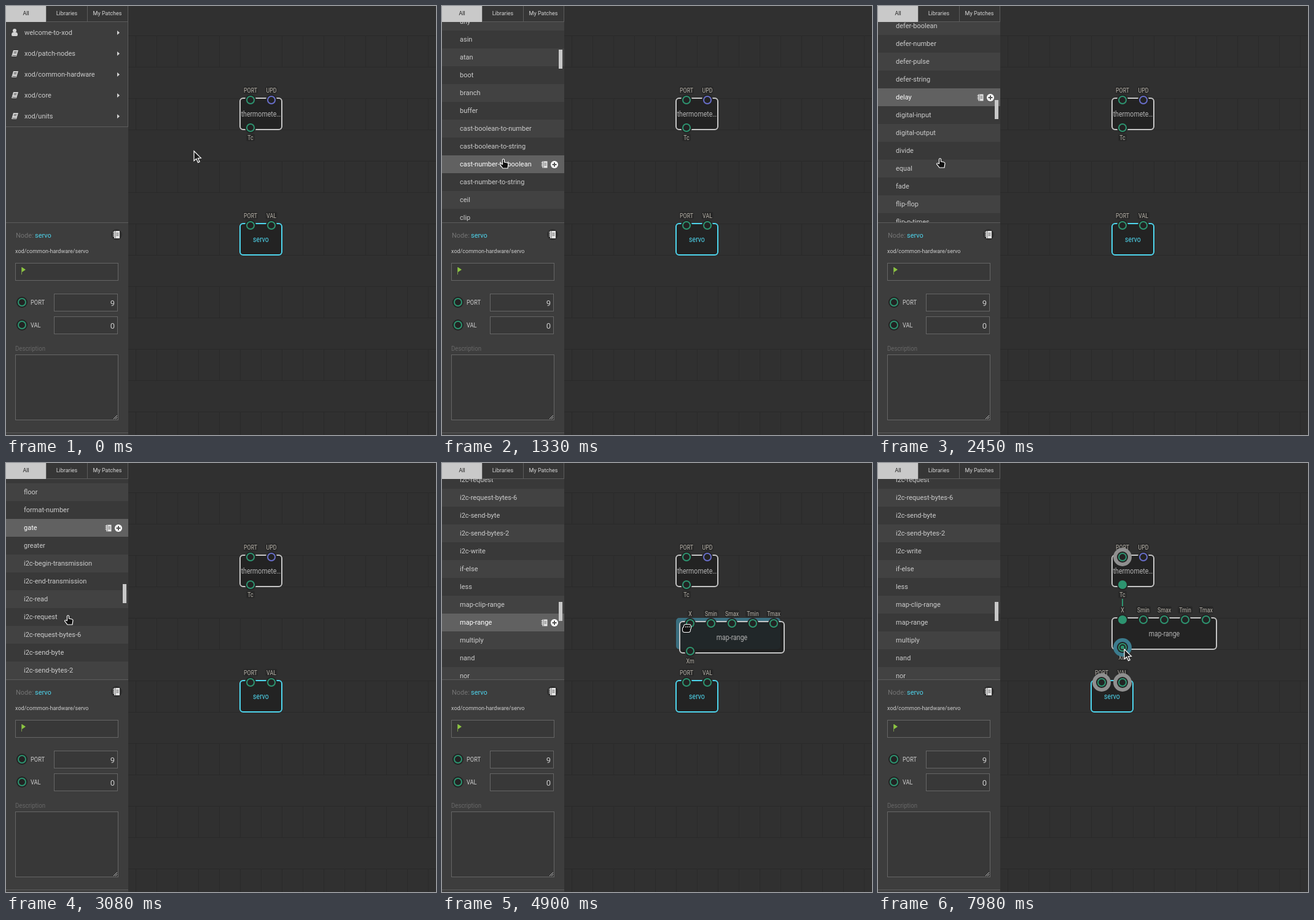
An HTML page with a canvas that plays this animation: 700 px wide and 698 px high, repeating every 8 s.

```html
<!DOCTYPE html>
<html lang="en">
<head>
<meta charset="utf-8">
<title>Patch editor</title>
<style>
html, body { margin: 0; width: 100%; height: 100%; overflow: hidden; background: #303030; }
canvas { display: block; }
</style>
</head>
<body>
<canvas id="stage" width="700" height="698"></canvas>
<script>
const ctx = document.getElementById('stage').getContext('2d');
const LOOP = 8000, TICK = 70;
const GREEN = '#2d9470', PULSE = '#686ec9', CYAN = '#4ed5ed', TEAL = '#3b7c8e';
const BODY = '#232323', TEXT = '#cccccc', EDGE = '#5c5c5c';

const coreItems = `absolute acos add analog-input and any asin atan boot branch buffer
cast-boolean-to-number cast-boolean-to-string cast-number-to-boolean cast-number-to-string
ceil clip clock concat console-log constant-boolean constant-number constant-string constrain
continuously cos count defer-boolean defer-number defer-pulse defer-string delay digital-input
digital-output divide equal fade flip-flop flip-n-times floor format-number gate greater
i2c-begin-transmission i2c-end-transmission i2c-read i2c-request i2c-request-bytes-6
i2c-send-byte i2c-send-bytes-2 i2c-write if-else less map-clip-range map-range multiply
nand nor not not-equal`.split(/\s+/);

// Keyframes: [time, ...values]
const scrollKeys = [[770, 0], [840, 25], [1750, 530], [1820, 530], [2730, 1105], [2800, 1118],
  [3080, 1261], [3360, 1484]];
const cursorKeys = [[0, 306, 236], [210, 82, 149], [350, 82, 149], [770, 98, 250], [840, 98, 250],
  [1820, 101, 248], [3430, 101, 248], [4060, 98, 264], [4130, 98, 264], [4600, 438, 278],
  [4900, 398, 268], [5040, 398, 268], [5810, 400, 199], [5950, 400, 199], [6370, 400, 255],
  [6440, 400, 255], [6860, 417, 381], [6930, 417, 381], [7280, 366, 391], [7420, 376, 386],
  [7490, 376, 386], [7700, 401, 303]];
// Hovered row is refreshed only now and then while the list scrolls.
const hoverTimes = [770, 1330, 1820, 2310, 2800, 3430];

function tween(keys, t) {
  if (t <= keys[0][0]) return keys[0].slice(1);
  const n = keys.findIndex(k => k[0] >= t);
  if (n < 0) return keys[keys.length - 1].slice(1);
  const a = keys[n - 1], b = keys[n], p = (t - a[0]) / (b[0] - a[0]);
  return a.slice(1).map((v, i) => v + (b[i + 1] - v) * p);
}

function rect(x, y, w, h, color) {
  ctx.fillStyle = color;
  ctx.fillRect(x, y, w, h);
}

function frame(x, y, w, h, color, fill) {
  rect(x, y, w, h, color);
  rect(x + 1, y + 1, w - 2, h - 2, fill);
}

function disc(x, y, r, color) {
  ctx.beginPath();
  ctx.arc(x, y, r, 0, Math.PI * 2);
  ctx.fillStyle = color;
  ctx.fill();
}

function shape(points, color, stroke) {
  ctx.beginPath();
  points.forEach(([x, y]) => ctx.lineTo(x, y));
  ctx.closePath();
  ctx.fillStyle = color;
  ctx.fill();
  if (stroke) {
    ctx.strokeStyle = stroke;
    ctx.lineWidth = 1.2;
    ctx.stroke();
  }
}

function at(x, y, draw) {
  ctx.save();
  ctx.translate(x, y);
  draw();
  ctx.restore();
}

function text(str, x, y, size, color = TEXT, align = 'left') {
  ctx.font = `${size}px Roboto, sans-serif`;
  ctx.textAlign = align;
  ctx.fillStyle = color;
  ctx.fillText(str, x, Math.round(y + size * 0.35));
}

// Narrow face used for nodes and pins
function narrow(str, x, y, size, color, align = 'center') {
  at(x, 0, () => {
    ctx.scale(0.88, 1);
    text(str, 0, y, size, color, align);
  });
}

function notebook(x, y, s) {
  at(x, y, () => {
    ctx.scale(s, s);
    rect(-4, -6, 9, 12, '#e6e6e6');
    for (let i = -4; i <= 4; i += 3) rect(-6, i - 0.5, 3, 1.2, '#e6e6e6');
    rect(-2.4, -6, 0.8, 12, '#555');
    for (let i = -3; i <= 1; i += 2) rect(-0.5, i, 4, 0.9, '#666');
  });
}

function plusButton(x, y) {
  disc(x, y, 6, '#fff');
  rect(x - 3.5, y - 1, 7, 2, '#555');
  rect(x - 1, y - 3.5, 2, 7, '#555');
}

function bookIcon(y) {
  shape([[12, y - 5], [20, y - 5], [17, y + 5], [9, y + 5]], '#d4d4d4');
  rect(13, y - 3, 4.5, 1, '#555');
  rect(12.5, y - 1, 4.5, 1, '#555');
  rect(10.5, y + 3, 6, 1, '#555');
}

function userIcon(y) {
  disc(14, y - 3, 3, '#d4d4d4');
  ctx.beginPath();
  ctx.roundRect(9, y - 0.5, 10, 6.5, [4, 4, 2, 2]);
  ctx.fill();
}

function libraryRow(name, top, open) {
  const y = top + 17;
  rect(0, top, 199, 34, '#3d3d3d');
  rect(0, top + 34, 199, 1, EDGE);
  rect(198, top, 1, 35, EDGE);
  name.includes('/') ? bookIcon(y) : userIcon(y);
  text(name, 30, y, 11);
  shape(open ? [[179, y - 1], [187, y - 1], [183, y + 3]]
             : [[181, y - 3], [185, y + 0.5], [181, y + 4]], '#d4d4d4');
}

function itemRow(name, i, top, hovered) {
  const y = top + 14;
  rect(0, top, 199, 29, hovered ? '#616161' : i % 2 ? '#424242' : '#393939');
  text(name, 29, y, 11, hovered ? '#fff' : TEXT);
  if (hovered) {
    notebook(167, y + 1, 0.9);
    plusButton(183, y + 1);
  }
}

function hoveredItem(t) {
  if (t < 350 || t > 5040) return -1;
  const when = t < 770 ? t : hoverTimes.filter(h => h <= t).pop();
  const [scroll] = tween(scrollKeys, when), [, y] = tween(cursorKeys, when);
  return Math.floor((y - 163 + scroll) / 29);
}

function drawList(t) {
  const open = t >= 350, [scroll] = tween(scrollKeys, t), s = Math.round(scroll);
  ctx.save();
  ctx.beginPath();
  ctx.rect(0, 26, 199, 326);
  ctx.clip();
  ['welcome-to-xod', 'xod/patch-nodes', 'xod/common-hardware', 'xod/core']
    .forEach((name, i) => libraryRow(name, 26 + 34 * i - s, open && i === 3));
  if (open) {
    const hovered = hoveredItem(t);
    coreItems.forEach((name, i) => {
      const top = 163 + 29 * i - s;
      if (top > -4 && top < 352) itemRow(name, i, top, i === hovered);
    });
    rect(190, Math.round(31.7 + 0.131 * scroll), 6, 31, '#c8c8c8');
  } else {
    libraryRow('xod/units', 162, false);
  }
  ctx.restore();
}

function drawTabs() {
  rect(0, 0, 199, 26, '#363636');
  rect(0, 0, 65, 26, '#c9c9c9');
  rect(65, 25, 134, 1, EDGE);
  [65, 132, 198].forEach(x => rect(x, 0, 1, 26, EDGE));
  text('All', 32.5, 12, 9, '#222', 'center');
  text('Libraries', 99, 12, 9, '#d4d4d4', 'center');
  text('My Patches', 165, 12, 9, '#d4d4d4', 'center');
}

function drawInspector() {
  rect(0, 352, 199, 346, '#3d3d3d');
  rect(0, 352, 199, 1, EDGE);
  text('Node:', 16, 373, 11, '#737373');
  text('servo', 47, 373, 11, CYAN);
  disc(180, 372, 9, '#2f2f2f');
  notebook(180, 372, 1);
  text('xod/common-hardware/servo', 15, 399, 9);

  frame(15, 418, 168, 29, '#666', '#383838');
  rect(25, 425, 1, 12, '#7a9a4a');
  shape([[26, 425], [32, 429], [26, 433]], '#8bc63f');

  [['PORT', '9', 482], ['VAL', '0', 519]].forEach(([name, value, y]) => {
    pin(26, y, {});
    narrow(name, 40, y, 10.5, TEXT, 'left');
    frame(78, y - 14, 104, 29, '#666', '#383838');
    text(value, 177, y + 1, 13, TEXT, 'right');
  });

  narrow('Description', 15, 557, 11, '#676767', 'left');
  frame(15, 567, 168, 107, '#666', '#383838');
  ctx.strokeStyle = '#bbb';
  ctx.lineWidth = 1;
  ctx.beginPath();
  [6, 3].forEach(d => {
    ctx.moveTo(181 - d, 672);
    ctx.lineTo(181, 672 - d);
  });
  ctx.stroke();
  rect(0, 694, 199, 1, EDGE);
}

function drawGrid() {
  rect(0, 0, 700, 698, '#303030');
  for (let y = 48; y < 698; y += 102) {
    rect(199, y, 501, 1, '#292929');
    rect(199, y + 51, 501, 1, '#292929');
    for (let x = 211; x < 700; x += 34) rect(x, y, 1, 51, '#2a2a2a');
  }
}

function pin(x, y, { color = GREEN, filled, halo, dot }) {
  if (halo) disc(x, y, 15, halo);
  disc(x, y, 9, BODY);
  disc(x, y, 7, color);
  if (!filled) disc(x, y, 5, BODY);
  if (dot) disc(x, y, 3, color);
}

function pinLabel(name, x, y) {
  const w = name.length * 5 + 4;
  ctx.beginPath();
  ctx.roundRect(x - w / 2, y - 6, w, 12, 3);
  ctx.fillStyle = '#282828';
  ctx.fill();
  narrow(name, x, y, 10, '#b3aea5');
}

function node(x, y, { name, inputs, output, selected }, pinState = {}, fill = BODY) {
  const w = Math.max(2, inputs.length) * 34;
  ctx.beginPath();
  ctx.roundRect(x, y, w, 51, 5);
  ctx.fillStyle = fill;
  ctx.fill();
  ctx.strokeStyle = selected ? CYAN : '#c4c4c4';
  ctx.lineWidth = 2;
  ctx.stroke();
  narrow(name, x + w / 2, y + 26, 12, selected ? CYAN : '#b2b2b2');

  const pins = inputs.map((label, i) => [label, x + 17 + 34 * i, y + 3, y - 13]);
  if (output) pins.push([output, x + 17, y + 48, y + 64]);
  pins.forEach(([label, px, , ly]) => pinLabel(label, px, ly));
  pins.forEach(([label, px, py]) =>
    pin(px, py, { color: label === 'UPD' ? PULSE : GREEN, ...pinState[label] }));
}

function ghost(x, y, w) {
  ctx.beginPath();
  ctx.roundRect(x, y, w, 51, 5);
  ctx.fillStyle = '#3a6f80';
  ctx.fill();
}

const snap = (v, origin, step) => origin + Math.round((v - origin) / step) * step;

const thermometer = { name: 'thermomete…', inputs: ['PORT', 'UPD'], output: 'Tc' };
const mapRange = { name: 'map-range', inputs: ['X', 'Smin', 'Smax', 'Tmin', 'Tmax'], output: 'Xm' };
const servo = { name: 'servo', inputs: ['PORT', 'VAL'], selected: true };

function drawPatch(t, cx, cy) {
  const linkingTc = t >= 6020 && t < 6510, linked = t >= 6510, linkingXm = t >= 7840;
  const open = { halo: '#8f8f8f' }, source = { halo: TEAL, dot: true };
  const joined = linked ? { filled: true } : {};
  const servoPins = linkingTc || linkingXm ? { PORT: open, VAL: open } : {};

  node(381, 150, thermometer, {
    PORT: linkingXm ? open : {},
    Tc: linkingTc ? source : t >= 5810 && !linked ? { dot: true } : joined
  });

  if (t >= 5040) {
    const state = { X: joined, Xm: linkingXm ? source : {} };
    if (linkingTc) mapRange.inputs.forEach(name => { state[name] = open; });
    node(381, 252, mapRange, state);
  }
  if (linked) rect(397, 221, 2, 12, GREEN);

  let sx = 381, sy = 354;
  if (t >= 7000 && t < 7490) {
    sx += cx - 417;
    sy += cy - 381;
    ghost(snap(sx, 381, 34), snap(sy, 354, 102), 68);
  } else if (t >= 7490) {
    sx = 347;
  }
  node(sx, sy, servo, servoPins);
}

function drawDragged(cx, cy) {
  const x = cx - 11, y = cy - 10;
  if (cx > 199) ghost(snap(x, 381, 34), snap(y, 252, 102), 170);
  node(x, y, mapRange, {}, 'rgba(30,32,32,.9)');
}

function arrowCursor() {
  shape([[0, 0], [0, 16], [3.8, 12.6], [6.6, 18.6], [9.2, 17.4], [6.4, 11.6], [11.4, 11.4]],
    '#1c1c1c', '#fff');
}

function handCursor() {
  ctx.beginPath();
  ctx.moveTo(-1.5, 9);
  ctx.lineTo(-1.5, 1);
  ctx.quadraticCurveTo(0, -1, 1.5, 1);
  ctx.lineTo(1.5, 5);
  ctx.lineTo(6, 6);
  ctx.quadraticCurveTo(8, 6.5, 8, 8);
  ctx.lineTo(7, 15);
  ctx.lineTo(-1, 15);
  ctx.lineTo(-5.5, 9);
  ctx.quadraticCurveTo(-5, 6.5, -1.5, 9);
  ctx.fillStyle = '#111';
  ctx.fill();
  ctx.strokeStyle = '#fff';
  ctx.lineWidth = 1.2;
  ctx.stroke();
}

function grabCursor() {
  ctx.beginPath();
  ctx.roundRect(-4, -5, 11, 8, 3);
  ctx.roundRect(-6, -1, 12, 8, 3);
  ctx.strokeStyle = '#fff';
  ctx.lineWidth = 2;
  ctx.stroke();
  ctx.fillStyle = '#111';
  ctx.fill();
  [-1, 2, 5].forEach(x => rect(x - 0.5, -3, 1, 3, '#ddd'));
}

function render(t) {
  const [cx, cy] = tween(cursorKeys, t).map(Math.round);
  const dragging = t >= 4130 && t < 5040;
  drawGrid();
  drawPatch(t, cx, cy);
  rect(0, 0, 199, 698, '#3d3d3d');
  drawList(t);
  drawTabs();
  drawInspector();
  if (dragging) drawDragged(cx, cy);
  at(cx, cy, dragging ? grabCursor : cx < 199 ? handCursor : arrowCursor);
}

function loop(now) {
  const t = now % LOOP;
  render(Math.floor(t / TICK) * TICK);
  requestAnimationFrame(loop);
}
requestAnimationFrame(loop);
</script>
</body>
</html>
```
